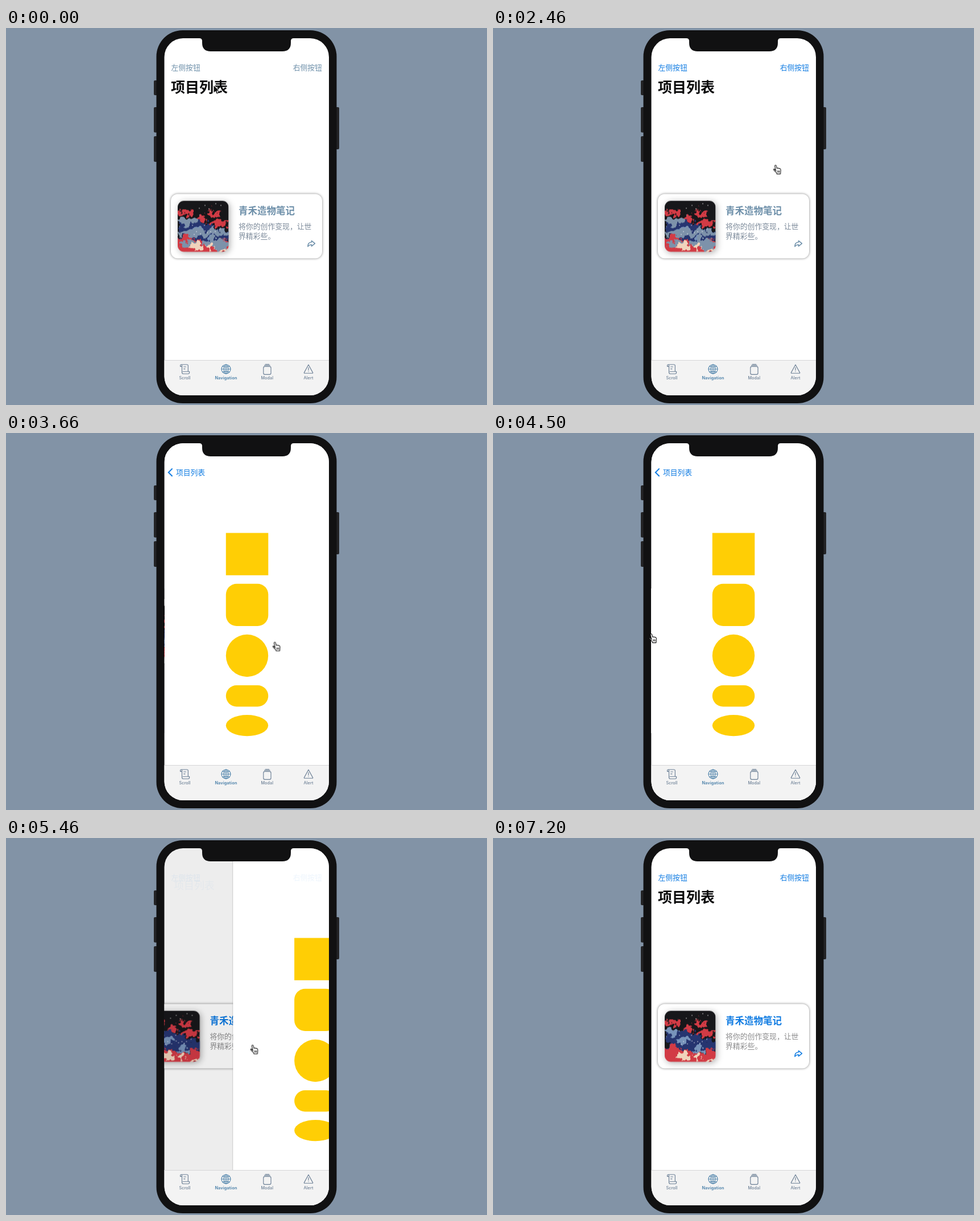
Write an HTML page that moves like this. It is 846 px wide and 662 px high and loops after 7620 ms.

```html
<!DOCTYPE html>
<html lang="zh-CN">
<head>
<meta charset="utf-8">
<title>Navigation demo</title>
<style>
/* --q: push progress (0 list, 1 detail); --k: card highlight */
@property --q { syntax: '<number>'; inherits: true; initial-value: 0; }
@property --k { syntax: '<number>'; inherits: true; initial-value: 0; }

html, body { margin: 0; width: 100%; height: 100%; overflow: hidden; background: #8293a6; }
svg { display: block; }
.stage {
  --loop: 7620ms;
  --steel: #6d8fa9;
  --blue: #0f7be2;
  font-family: "Noto Sans CJK SC", "Noto Sans CJK", "Noto Sans", sans-serif;
  animation: push var(--loop) linear infinite;
}

/* navigation */
.list { transform: translateX(calc(-87px * var(--q))); }
.dim { opacity: calc(.12 * var(--q)); }
.detail { transform: translateX(calc(290px * (1 - var(--q)))); }
.edge { opacity: calc(.1 * min(1, var(--q) * 10)); }
.bar { font-size: 12.8px; font-weight: 500; opacity: calc((1 - var(--q)) * (1 - var(--q)) * (1 - var(--q))); }
.large, .back {
  font-size: 25px;
  transform: translate(calc(290px + 9px * var(--q)), calc(112.5px - 38.2px * var(--q))) scale(calc(1 - .49 * var(--q)));
}
.large { font-weight: 700; fill: #0b0b0c; opacity: calc((.41 - var(--q)) / .41); }
.back { fill: var(--blue); opacity: calc(1 - 2.3 * (1 - var(--q))); }
.chevron { fill: none; stroke: var(--blue); stroke-width: 2; opacity: calc((var(--q) - .87) / .13); }

/* buttons and card */
.left { animation: tintL var(--loop) step-end infinite, tapL var(--loop) linear infinite; }
.right { animation: tintR var(--loop) step-end infinite, tapR var(--loop) linear infinite; }
.card { animation: highlight var(--loop) ease-out infinite; }
.plate { fill: #fff; filter: drop-shadow(0 0 2px rgba(0,0,0,.5)); opacity: calc(1 - .75 * var(--k)); }
.pressed { fill: #e6e6e6; filter: blur(1.2px); opacity: var(--k); }
.copy { opacity: calc(1 - .68 * var(--k)); }
.accent { animation: tintCard var(--loop) step-end infinite; }
.body { font-size: 12.85px; animation: tintBody var(--loop) step-end infinite; }
.frame { filter: drop-shadow(2px 2px 6px rgba(0,0,0,.33)); opacity: calc(1 - .55 * var(--k)); }
.art { filter: grayscale(calc(.9 * var(--k))); }
.paint { filter: url(#brush); }
.haze { animation: haze var(--loop) step-end infinite; }

.tabs { font: 500 7.2px Inter, "Open Sans", sans-serif; letter-spacing: .1px; text-anchor: middle; }
.icon { fill: none; stroke: #6b7f95; stroke-width: 1.15; stroke-linejoin: round; stroke-linecap: round; }

.cursor { animation: move var(--loop) ease-in-out infinite, exit var(--loop) step-end infinite; }
.hand { animation: hand var(--loop) step-end infinite; }
.arrow { animation: arrow var(--loop) step-end infinite; }

@keyframes push {
  0% { --q: 0; }
  42.52% { --q: 0; animation-timing-function: cubic-bezier(.2,.7,.3,1); }
  48.82%, 62.2% { --q: 1; }
  64.96% { --q: .965; }
  67.72% { --q: .871; }
  69.29% { --q: .78; }
  74.8% { --q: .32; }
  75.59% { --q: .24; animation-timing-function: ease-out; }
  77.95%, 100% { --q: 0; }
}
@keyframes highlight {
  0%, 37.8% { --k: 0; }
  41.73%, 43.31% { --k: 1; }
  47.24%, 100% { --k: 0; }
}
@keyframes tapL { 0%, 7.09% { opacity: 1; } 7.87%, 11.81% { opacity: .25; } 15.75%, 100% { opacity: 1; } }
@keyframes tapR { 0%, 21.26% { opacity: 1; } 22.05%, 23.62% { opacity: .25; } 25.2%, 100% { opacity: 1; } }
@keyframes tintL { 0% { fill: var(--steel); } 7.09%, 100% { fill: var(--blue); } }
@keyframes tintR { 0% { fill: var(--steel); } 21.26%, 100% { fill: var(--blue); } }
@keyframes tintCard { 0% { color: var(--steel); } 37.8%, 100% { color: var(--blue); } }
@keyframes tintBody { 0% { fill: #7c8a9a; } 37.8%, 100% { fill: #8b8b8c; } }
@keyframes haze { 0% { opacity: 1; } 37.8%, 100% { opacity: 0; } }

@keyframes move {
  0%, .5% { transform: translate(361px, 99px); }
  4.72%, 16.54% { transform: translate(312px, 66px); }
  18.9% { transform: translate(443px, 66px); animation-timing-function: ease-out; }
  21.26%, 27.56% { transform: translate(526px, 65px); }
  36.22%, 48.03% { transform: translate(468.5px, 366.5px); }
  57.48% { transform: translate(282px, 355px); }
  59.06%, 62.2% { transform: translate(274px, 352px); animation-timing-function: ease-in; }
  67.72% { transform: translate(329px, 350.5px); animation-timing-function: linear; }
  74.8% { transform: translate(509px, 372.5px); animation-timing-function: ease-out; }
  75.59%, 79.53% { transform: translate(514px, 374px); }
  86.61%, 88.98% { transform: translate(480px, 396px); }
  94.3%, 100% { transform: translate(152px, 660px); }
}
@keyframes exit { 0% { opacity: 1; } 94.4%, 100% { opacity: 0; } }
@keyframes hand { 0% { opacity: 0; } 3.94% { opacity: 1; } 92.1%, 100% { opacity: 0; } }
@keyframes arrow { 0% { opacity: 1; } 3.94% { opacity: 0; } 92.1%, 100% { opacity: 1; } }
</style>
</head>
<body>
<svg class="stage" width="846" height="662" viewBox="0 0 846 662">
  <defs>
    <clipPath id="screen"><rect x="278.5" y="18" width="289.5" height="627" rx="33"/></clipPath>
    <clipPath id="thumb"><rect width="89.5" height="89.5" rx="11"/></clipPath>
    <filter id="brush" x="-20%" y="-20%" width="140%" height="140%">
      <feTurbulence type="fractalNoise" baseFrequency=".09" numOctaves="3" seed="7"/>
      <feDisplacementMap in="SourceGraphic" scale="24" xChannelSelector="R" yChannelSelector="G"/>
      <feGaussianBlur stdDeviation=".5"/>
    </filter>
  </defs>

  <!-- phone body -->
  <g fill="#232325">
    <rect x="260" y="92" width="8" height="26" rx="2"/>
    <rect x="260" y="139" width="8" height="44.5" rx="2"/>
    <rect x="260" y="190" width="8" height="45" rx="2"/>
    <rect x="578" y="139" width="8" height="74" rx="2"/>
  </g>
  <rect x="264.5" y="4" width="317" height="655" rx="46" fill="#111112"/>

  <g clip-path="url(#screen)">
    <rect x="278" y="18" width="290" height="627" fill="#fff"/>

    <g class="list">
      <g class="card">
        <rect class="plate" x="290" y="291.5" width="266" height="113" rx="12"/>
        <rect class="pressed" x="290" y="291.5" width="266" height="113" rx="12"/>
        <g class="frame" transform="translate(302 303.5)">
          <g class="art" clip-path="url(#thumb)">
            <rect width="89.5" height="89.5" fill="#17171a"/>
            <g class="paint">
              <g fill="#25346f">
                <ellipse cx="34" cy="48" rx="31" ry="14"/>
                <ellipse cx="66" cy="60" rx="30" ry="11"/>
                <ellipse cx="30" cy="66" rx="30" ry="10"/>
              </g>
              <g fill="#d23b45">
                <ellipse cx="14" cy="20" rx="16" ry="4"/>
                <ellipse cx="64" cy="22" rx="13" ry="4" transform="rotate(18 64 22)"/>
                <ellipse cx="74" cy="40" rx="18" ry="6"/>
                <ellipse cx="42" cy="32" rx="9" ry="4"/>
                <ellipse cx="12" cy="74" rx="20" ry="12"/>
                <ellipse cx="46" cy="84" rx="48" ry="11"/>
                <ellipse cx="82" cy="74" rx="12" ry="8"/>
              </g>
              <g fill="#7894bb">
                <ellipse cx="12" cy="36" rx="12" ry="6"/>
                <ellipse cx="30" cy="52" rx="12" ry="5"/>
                <ellipse cx="58" cy="70" rx="12" ry="5"/>
              </g>
              <g fill="#7d92aa" class="haze">
                <ellipse cx="18" cy="35" rx="19" ry="7"/>
                <ellipse cx="26" cy="57" rx="26" ry="7"/>
                <ellipse cx="66" cy="56" rx="24" ry="6"/>
                <ellipse cx="68" cy="75" rx="26" ry="9"/>
                <ellipse cx="18" cy="75" rx="16" ry="6"/>
              </g>
              <g fill="#f0d3bc">
                <ellipse cx="32" cy="81" rx="11" ry="6"/>
                <ellipse cx="57" cy="82" rx="8" ry="5"/>
                <ellipse cx="80" cy="86" rx="10" ry="3"/>
              </g>
            </g>
            <path d="M48 8h0M55 14h0M76 8h0M67 5h0M38 13h0M26 43h0M33 54h0M40 58h0M48 53h0M52 56h0M58 54h0M62 57h0M66 54h0M29 59h0M74 50h0M47 43h0" stroke="#fff" stroke-width="1.5" stroke-linecap="round"/>
          </g>
        </g>
        <g class="copy">
          <g class="accent">
            <text x="409" y="327.3" font-size="16.5" font-weight="700" fill="currentColor">青禾造物笔记</text>
            <path d="M537.5 373.6L543.4 378.4L537.5 383.2V380.6C534.2 380.5 532.3 381.8 530.9 383.8C530.9 379.4 533 376.3 537.5 376.1Z" fill="none" stroke="currentColor" stroke-width="1.5" stroke-linejoin="round"/>
          </g>
          <g class="body">
            <text x="409" y="353.4">将你的创作变现，让世</text>
            <text x="409" y="369.8">界精彩些。</text>
          </g>
        </g>
      </g>
    </g>
    <rect class="dim" x="278" y="18" width="290" height="627"/>

    <g class="detail">
      <rect class="edge" x="276.5" y="18" width="2" height="627"/>
      <rect x="278" y="18" width="290" height="627" fill="#fff"/>
      <g fill="#ffce05">
        <rect x="385.8" y="175.5" width="74.5" height="74.3"/>
        <rect x="385.8" y="264.7" width="74.5" height="74.3" rx="19"/>
        <circle cx="423" cy="391" r="37.2"/>
        <rect x="385.8" y="443" width="74.5" height="37.4" rx="18.7"/>
        <ellipse cx="423" cy="513.6" rx="37.2" ry="18.6"/>
      </g>
    </g>

    <g class="bar">
      <text class="left" x="290.5" y="74.4">左侧按钮</text>
      <text class="right" x="504.7" y="74.4">右侧按钮</text>
    </g>
    <text class="large">项目列表</text>
    <text class="back">项目列表</text>
    <path class="chevron" d="M292.6 62.4L285.8 69.2L292.6 76"/>

    <rect x="278" y="583" width="290" height="62" fill="#f3f3f3"/>
    <rect x="278" y="583" width="290" height="1" fill="#d6d6d8"/>
    <g class="icon">
      <path d="M309.5 603.2V593Q309.5 591 308 591Q306.6 591 306.6 592.6V594.4H309.5M308 591H318.3Q320.3 591 320.3 593V603.2M311 603.2H322.6V605Q322.6 607.2 320.4 607.2H312Q309.5 607.2 309.5 604.4V603.2M312.6 595H316.4M312.6 598.6H315"/>
      <g stroke="#5688ae">
        <circle cx="387" cy="599" r="8"/>
        <ellipse cx="387" cy="599" rx="3.8" ry="8"/>
        <path d="M379 599H395M387 591V607M381 593.7Q387 597.2 393 593.7M381 604.3Q387 600.8 393 604.3"/>
      </g>
      <rect x="452.8" y="594.4" width="13.2" height="14" rx="2.4"/>
      <path d="M454.6 592.4H464.2M456.2 590.5H462.6"/>
      <path d="M532 591.2L539.6 605.1Q540 606.2 538.8 606.2H525.2Q524 606.2 524.4 605.1ZM532 596V601M532 603.4V603.5"/>
    </g>
    <g class="tabs" fill="#6b7f95">
      <text x="314.5" y="617">Scroll</text>
      <text x="387" y="617" fill="#5688ae" font-weight="650">Navigation</text>
      <text x="459.3" y="617">Modal</text>
      <text x="532" y="617">Alert</text>
    </g>
  </g>
  <path d="M340 16H506V18Q501 18 501 23V26Q501 41 486 41H360Q345 41 345 26V23Q345 18 340 18Z" fill="#111112"/>

  <g class="cursor" stroke-linejoin="round">
    <path class="arrow" d="M4 .8V15.6L7.5 12.4L9.8 17.6L12.2 16.5L10 11.6H14.6Z" fill="#0a0a0a" stroke="#fff" stroke-width="1.1"/>
    <g class="hand" stroke="#111" stroke-width="1.1">
      <path d="M4.9 10.8L3 2.6Q2.8 1 4.1 .8Q5.3 .7 5.7 2.2L6.8 6.3Q7.5 5.5 8.6 6.4Q9.6 5.6 10.8 6.7Q12.4 6.2 13 7.8Q14.2 10.6 13.2 13.2L12.8 16.4H6.6L6.2 14.4Q4 12.4 1.2 9.2Q.6 8 1.6 7.6Q2.8 7.4 4.9 10.8Z" fill="#fff"/>
      <path d="M7.7 10.3L8 13.8M9.6 10.3V13.8M11.5 10.3L11.3 13.8" stroke-width=".9"/>
    </g>
  </g>
</svg>
</body>
</html>
```
